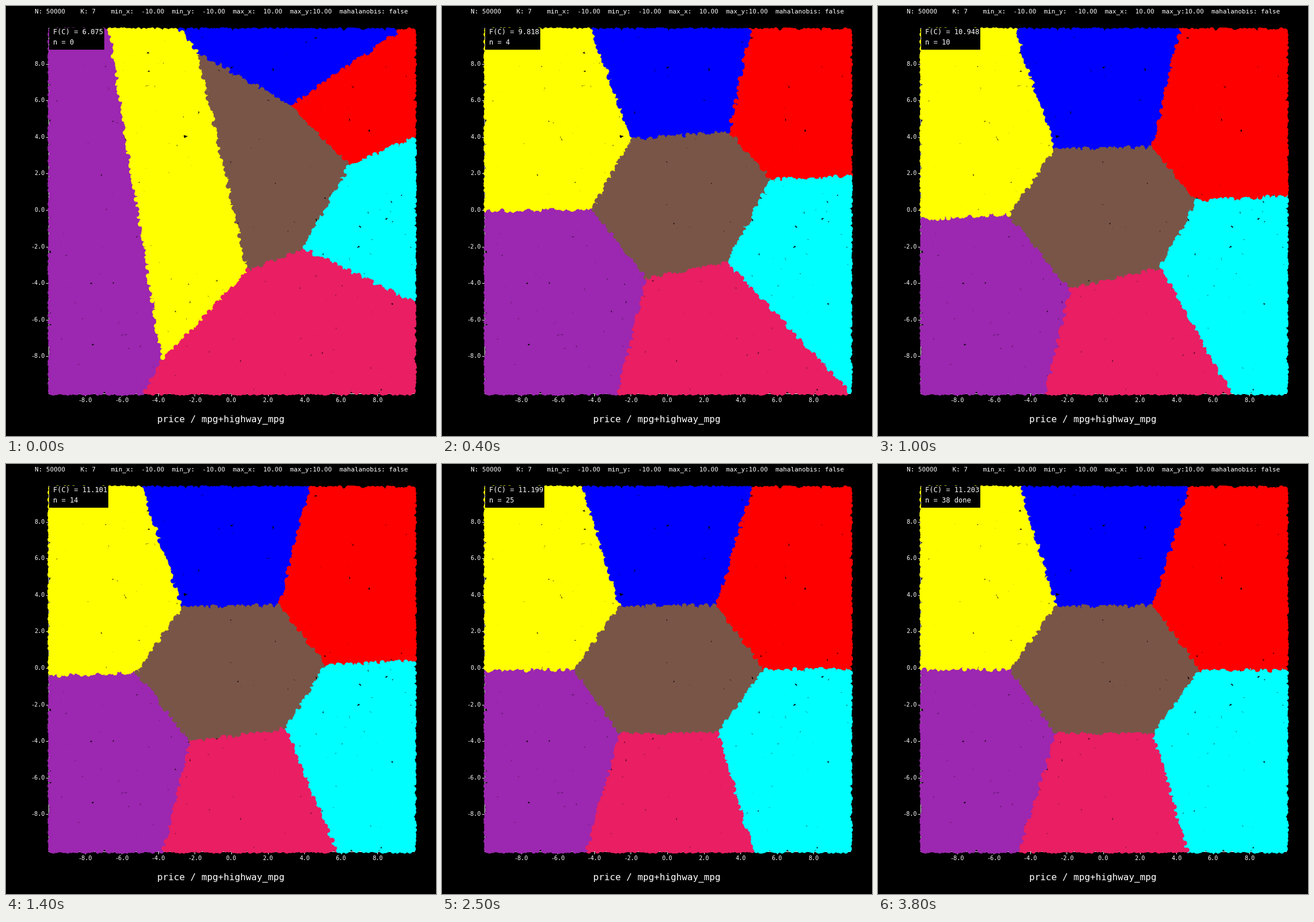
Recreate the animation shown at these times as a matplotlib script. Size 748 by 748 pixels, loop 5300 ms.

```python
import numpy as np
import matplotlib.pyplot as plt
from matplotlib.animation import FuncAnimation
from matplotlib.patches import Rectangle

SIZE, DPI = 748, 100
PT = 72 / DPI  # points per pixel
STEPS, FRAMES, INTERVAL = 38, 53, 100
LAYERS = 6

# Colour and starting centre of each cluster
CLUSTERS = {
    "#9C27B0": (150, 323),
    "#FFFF00": (293, 300),
    "#0000FF": (555, 101),
    "#795548": (464, 261),
    "#FF0000": (583, 142),
    "#00FFFF": (681, 380),
    "#E91E63": (586, 576),
}
SCORES = {0: 6.075, 2: 8.467, 6: 10.502, 10: 10.948, 18: 11.162, 25: 11.199, 38: 11.203}
LIMIT = 11.2032


def make_points(side=224, spread=8):
    """Locally random, evenly spread overall: a grid with wide, wrapped jitter."""
    rng = np.random.default_rng(7)
    grid = np.stack(np.meshgrid(np.arange(side), np.arange(side)), -1).reshape(-1, 2)
    unit = (grid + spread * rng.random(grid.shape)) / side % 1
    return rng.permutation(np.array([75.8, 41]) + unit * np.array([634, 632]))


def k_means(points, centers):
    """Cluster of every point at each step."""
    history = []
    for _ in range(STEPS + 1):
        labels = ((points[:, None] - centers) ** 2).sum(axis=2).argmin(axis=1)
        history.append(labels)
        centers = np.array([points[labels == k].mean(axis=0) for k in range(len(centers))])
    return history


points = make_points()
history = k_means(points, np.array(list(CLUSTERS.values()), float))

# The score closes in on its limit exponentially between the key steps.
gaps = np.log(LIMIT - np.array(list(SCORES.values())))
scores = LIMIT - np.exp(np.interp(range(STEPS + 1), list(SCORES), gaps))

fig = plt.figure(figsize=(SIZE / DPI, SIZE / DPI), dpi=DPI, facecolor="black")
ax = fig.add_axes([0, 0, 1, 1])
ax.set_xlim(0, SIZE)
ax.set_ylim(SIZE, 0)
ax.axis("off")


def label(x, y, text, size, ha="left", va="center", **kw):
    return ax.text(x, y, text, color="white", family="DejaVu Sans Mono",
                   fontsize=size * PT, ha=ha, va=va, **kw)


def rule(xs, ys):
    ax.plot(xs, ys, color="white", lw=PT, zorder=1)


label(50, 10, "N: 50000    K: 7    min_x:  -10.00  min_y:  -10.00  "
      "max_x:  10.00  max_y:10.00  mahalanobis: false", 11)
label(374, 720, "price / mpg+highway_mpg", 16, ha="center")
rule([74.5, 74.5], [38, 674])
rule([74, 710], [673.5, 673.5])
for v in range(-8, 9, 2):
    x, y = 392 + 31.8 * v, 355 - 31.8 * v
    label(68, y, f"{v:.1f}", 10.1, ha="right")
    label(x, 686, f"{v:.1f}", 10.1, ha="center")
    rule([70, 74], [y, y])
    rule([x, x], [674, 678])

# Interleaved layers let every colour overlap its neighbours.
dots = [[ax.plot([], [], "o", ms=8.5 * PT, mew=0, color=color, antialiased=False,
                 zorder=2 + layer / LAYERS)[0] for color in CLUSTERS]
        for layer in range(LAYERS)]
box = ax.add_patch(Rectangle((75, 38), 96, 38, fc="black", lw=0, zorder=4))
score_text = label(82, 48.5, "", 12, va="baseline", zorder=5)
step_text = label(82, 67, "", 12, va="baseline", zorder=5)


def update(frame):
    n = min(frame, STEPS)
    for layer, row in enumerate(dots):
        pts, ids = points[layer::LAYERS], history[n][layer::LAYERS]
        for k, line in enumerate(row):
            line.set_data(*pts[ids == k].T)
    score = f"F(C) = {scores[n]:.3f}"
    score_text.set_text(score)
    step_text.set_text(f"n = {n}" + (" done" if n == STEPS else ""))
    box.set_width(9 + 7.25 * len(score))


anim = FuncAnimation(fig, update, frames=FRAMES, interval=INTERVAL, repeat=True)
plt.show()
```
